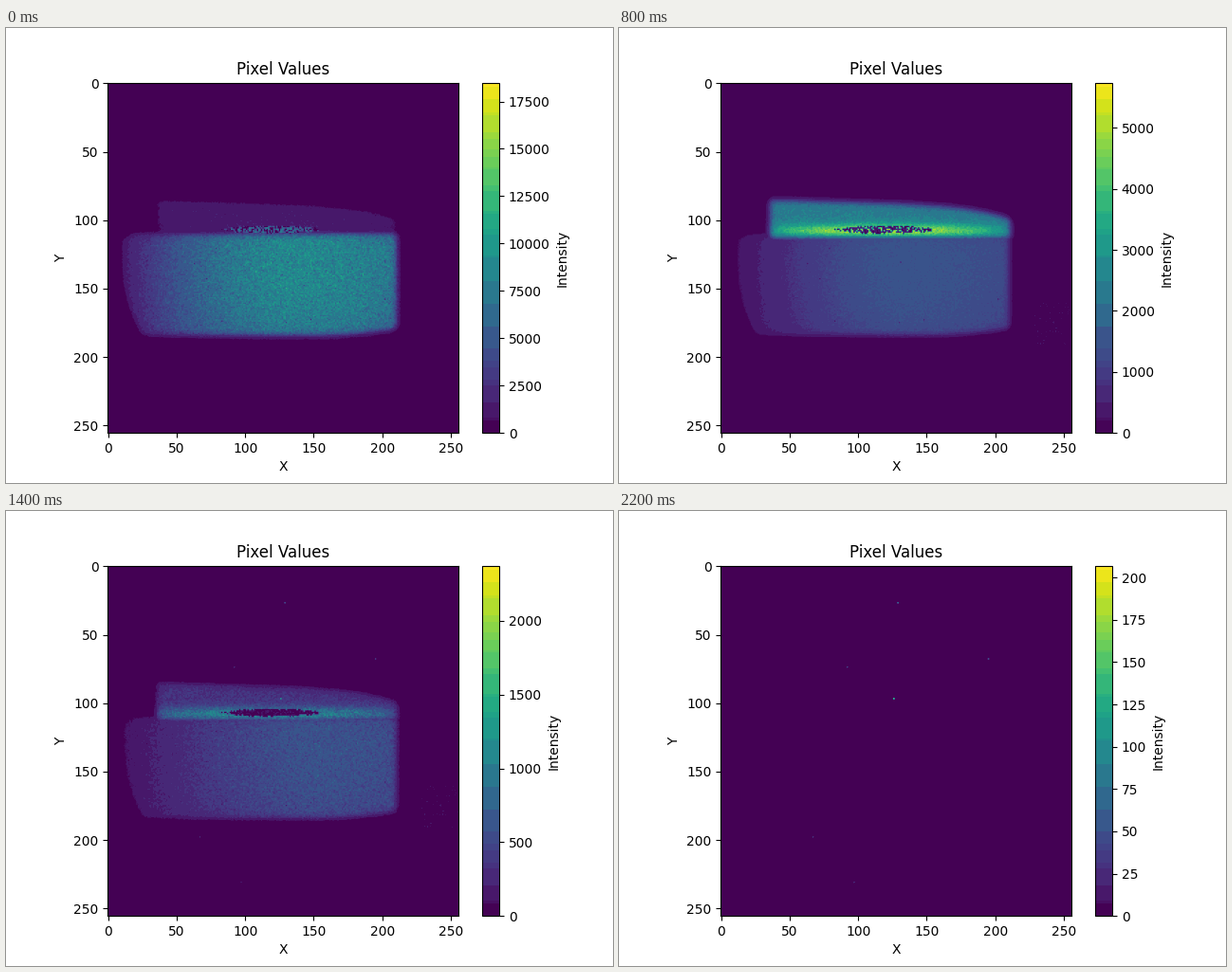
These frames come from a looping animation (640x480 px, 2300 ms). A matplotlib script:

```python
import matplotlib.pyplot as plt
import numpy as np
from matplotlib.animation import FuncAnimation
from matplotlib.colors import ListedColormap

SIZE, FRAMES, STEP = 256, 23, 100

# Scale top, and peak of each part as a fraction of it, at the key times (ms)
TIMES = [0, 300, 800, 1200, 1400, 1600, 1800, 2200]
VMAX = [18496, 16602, 5742, 2881, 2375, 1644, 1080, 207]
LOWER = [.47, .17, .26, .45, .25, .13, .06, 0]
UPPER = [.07, .32, .43, .34, .15, .06, .02, 0]
RIDGE = [.08, .64, .92, .78, .48, .15, .05, 0]

HOT = [(126, 97), (129, 27), (195, 68), (92, 74), (67, 198), (97, 231)]
BLOBS = [(130, 69), (188, 65), (232, 31), (208, 200), (215, 200)]

y, x = np.mgrid[:SIZE, :SIZE].astype(float)
rng = np.random.default_rng(7)
fixed, gleam = rng.random((2, SIZE, SIZE))
dead = rng.integers((112, 20), (180, 205), (9, 2))


def soft(d, w):
    return 1 / (1 + np.exp(-np.clip(d / w, -40, 40)))


def edge(d):
    """Smooth border with a faint, wider halo."""
    return .85 * soft(d, 1.2) + .15 * soft(d, 3.5)


def at(ms, values):
    return np.interp(ms, TIMES, values)


# Outlines of the two exposed areas
left = 10 + 13 * (np.clip(y - 130, 0, None) / 50) ** 2 + np.clip(116 - y, 0, 6)
floor = 184 - 5 * (np.clip(x - 150, 0, None) / 60) ** 2
lower_mask = edge(x - left) * edge(210 - x) * edge(y - 110.5) * edge(floor - y)
span = np.clip((x - 36) / 172, 0, 1.1)
roof = 86 + 5 * span + 8 * span ** 6
upper_mask = edge(x - 36) * edge(210.5 - x) * edge(y - roof) * edge(113.5 - y)

lower_shade = 1 - .12 * ((y - 132) / 50) ** 2
ridge_shade = 1 - .4 * ((x - 120) / 85) ** 2
haze_shade = .3 + .7 * soft(x + .1 * (y - 128) - 88, 20)

oval = ((x - 120) / 33) ** 2 + ((y - 107.3) / 2.7) ** 2
slit = oval + .7 * (gleam - .5) < 1
blobs = np.any([np.hypot(x - bx, y - by) < 3.7 for bx, by in BLOBS], axis=0)
specks = (x > 228) & (y > 160) & (y < 192) & (fixed < .06)


def picture(i):
    """Intensities from 0 to 1."""
    ms = i * STEP
    noise = np.random.default_rng(100 + i).normal(size=(SIZE, SIZE))
    grain = np.interp(ms, [0, 300, 1200, 1600], [.13, .045, .06, .22])
    lower, upper, ridge = at(ms, LOWER), at(ms, UPPER), at(ms, RIDGE)

    # The brightest column of the lower area drifts right as it fades
    mid = np.interp(ms, [1200, 1600], [130, 175])
    shade = (1 - .8 * (np.clip(mid - x, 0, None) / (mid - 15)) ** 1.5
             - .15 * (np.clip(x - mid, 0, None) / 80) ** 2)
    low = lower * shade * lower_shade * lower_mask

    spread = np.interp(ms, [300, 800], [8, 5])
    glow = np.exp(-((y - 108.3) / spread) ** 2)
    top = (upper + (ridge * ridge_shade - upper) * glow) * upper_mask
    img = np.maximum(low, top) * (1 + grain * noise)

    img[slit] = np.maximum(img, max(ridge, lower) * (.4 + .6 * gleam))[slit]
    holes = slit & (fixed < np.interp(ms, [0, 1400], [.4, 1]))
    img[holes] = .12 * ridge * gleam[holes]

    haze = np.interp(ms, [600, 800, 1200, 1350], [0, .012, .068, 0])
    fog = haze * haze_shade * (1 + .14 * noise)
    fog[blobs] *= .3
    fog[specks] = .045 * (600 < ms < 1500)
    img = np.maximum(img, fog)

    img[dead[:, 0], dead[:, 1]] *= .35
    spots = np.interp(ms, [1000, 1200, 2200], [0, .55, 1])
    for k, (hx, hy) in enumerate(HOT):
        img[hy, hx] = max(img[hy, hx], .9 * spots / (k + 1))
    return np.clip(img, 0, 1)


viridis = plt.get_cmap("viridis")(np.arange(256))[:, :3]
cells = np.right_shift((viridis * 255).astype(int), [5, 4, 5]) @ [256, 16, 1]
groups = np.unique(cells, return_inverse=True)[1]


def palette(img):
    """Average the colours sharing a coarse RGB cell, weighted by their use."""
    used = np.bincount((img * 255).astype(int).ravel(), minlength=256)
    weight = 2 * used + 27
    total = np.bincount(groups, weight)
    mean = [np.bincount(groups, weight * c) / total for c in viridis.T]
    return ListedColormap(np.transpose(mean)[groups])


fig, ax = plt.subplots(figsize=(6.4, 4.8), dpi=100)
im = ax.imshow(np.zeros((SIZE, SIZE)), vmin=0, vmax=VMAX[0])
fig.colorbar(im, ax=ax, label="Intensity")
ax.set(title="Pixel Values", xlabel="X", ylabel="Y")


def update(i):
    img = picture(i)
    vmax = np.exp(at(i * STEP, np.log(VMAX)))
    im.set_data(img * vmax)
    im.set_cmap(palette(img))
    im.set_clim(0, vmax)
    return [im]


anim = FuncAnimation(fig, update, frames=FRAMES, interval=STEP, repeat=True)
plt.show()
```
